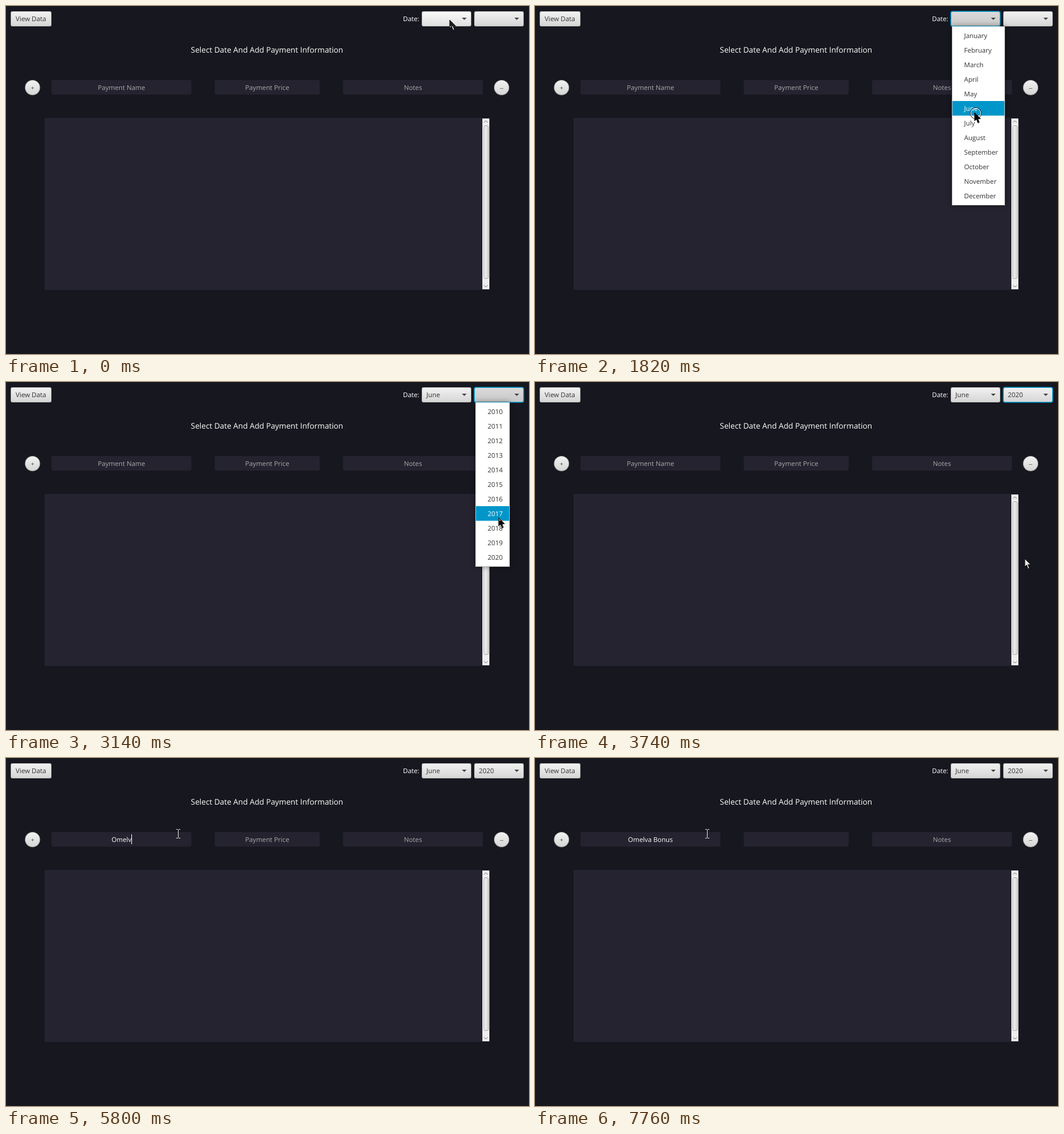
Write an HTML page that moves like this. It is 897 by 597 pixels and loops after 8000 ms.

```html
<!DOCTYPE html>
<html lang="en">
<head>
<meta charset="utf-8">
<title>Payment form</title>
<style>
  html, body { margin: 0; width: 100%; height: 100%; overflow: hidden; background: #17171f; }
  svg { display: block; width: 100vw; height: 100vh; }
  text {
    font: 11.3px "Open Sans", "Noto Sans", sans-serif;
    fill: #333; white-space: pre; text-rendering: geometricPrecision;
  }
  .light { fill: #fff; }
  .title { font-size: 13.3px; }
  .prompt { fill: #aaaaac; }
  .mid { text-anchor: middle; }
  .small { font-size: 9.5px; }
  .panel { fill: #24232f; }
  .popup { filter: drop-shadow(0 0 5px rgba(0, 0, 0, .45)); }
  .invert { fill: #fff; mix-blend-mode: difference; }
  .hidden { display: none; }
</style>
</head>
<body>
<svg id="stage" viewBox="0 0 897 597" preserveAspectRatio="none">
  <defs>
    <linearGradient id="normal" x2="0" y2="1"><stop stop-color="#f1f1f1"/><stop offset="1" stop-color="#d6d6d6"/></linearGradient>
    <linearGradient id="hover" x2="0" y2="1"><stop stop-color="#fafafa"/><stop offset="1" stop-color="#dfdfdf"/></linearGradient>
    <linearGradient id="pressed" x2="0" y2="1"><stop stop-color="#dadada"/><stop offset="1" stop-color="#c8c8c8"/></linearGradient>
    <linearGradient id="thumb"><stop stop-color="#f0f0f0"/><stop offset="1" stop-color="#d9d9d9"/></linearGradient>
  </defs>
</svg>
<script>
const LOOP = 8000, STEP = 120, FIRST_MOVE = 620, ROW = 25, LIST_TOP = 38;
const stage = document.getElementById('stage');
const $ = id => document.getElementById(id);

const months = ['January', 'February', 'March', 'April', 'May', 'June', 'July',
  'August', 'September', 'October', 'November', 'December'];
const years = Array.from({ length: 11 }, (_, i) => String(2010 + i));

// time, x, y of the pointer
const path = [
  [0, 761, 24], [860, 761, 24], [1700, 754, 183], [1940, 754, 183],
  [2240, 856, 28], [2660, 856, 28], [3380, 841, 305], [3740, 840, 303],
  [3860, 835, 277], [4460, 295, 130]
];
const clicks = [620, 1820, 2420, 3500];

const entry = 'Omelva Bonus';
// time, number of typed letters
const typing = [[4950, 1], [5190, 2], [5310, 3], [5550, 4], [5800, 5], [5920, 6],
  [6040, 7], [6410, 8], [6530, 9], [6770, 11], [6890, 12]];
const NAME_FOCUS = 4460, PRICE_FOCUS = 7390, CARET_OFF = 7760;

const text = (x, y, str, cls = '', id = '') =>
  `<text x="${x}" y="${y}" class="${cls}" id="${id}">${str}</text>`;
const rect = (x, y, w, h, attrs = '') =>
  `<rect x="${x}" y="${y}" width="${w}" height="${h}" ${attrs}/>`;

const button = (x, w, id = '') =>
  rect(x, 9, w, 26, 'rx="3" fill="#b5b5b5"') +
  rect(x + 1, 10, w - 2, 24, `rx="2" fill="url(#normal)" id="${id}"`);

const combo = (x, id) => button(x, 85, id) +
  rect(x + .2, 9.2, 84.6, 25.6, `rx="3" fill="none" stroke="#039ed3" stroke-width="1.5" id="${id}Ring"`) +
  text(x + 8, 26, '', '', id + 'Text') +
  `<path d="M${x + 69} 20h8l-4 4z" fill="#444"/>`;

const field = (x, w, prompt, id) =>
  rect(x, 127, w, 25, 'rx="3" class="panel"') +
  text(x + w / 2, 144, prompt, 'mid prompt', id);

const round = (x, label) =>
  `<circle cx="${x}" cy="140" r="13" fill="#b3b3b3"/>
   <circle cx="${x}" cy="139.7" r="12" fill="url(#normal)"/>` +
  text(x, 143.5, label, 'mid small');

const popup = (x, w, items, id) => {
  const h = items.length * ROW + 7;
  return `<g id="${id}">` +
    rect(x, 35, w, h, 'fill="#c4c4c4" class="popup"') +
    rect(x + 1, 35, w - 2, h - 1, 'fill="#fff"') +
    rect(x + 1, LIST_TOP, w - 2, ROW, `fill="#0096c9" id="${id}Mark"`) +
    items.map((s, i) => text(x + 21, 55 + i * ROW, s)).join('') + '</g>';
};

stage.insertAdjacentHTML('beforeend',
  rect(0, 0, 897, 597, 'fill="#17171f"') +
  button(8, 70) + text(42.7, 26, 'View Data', 'mid') +
  text(681, 26, 'Date:', 'light') + combo(713, 'month') + combo(803, 'year') +
  text(447.7, 80, 'Select Date And Add Payment Information', 'mid light title') +
  round(45.5, '+') + round(850, '--') +
  field(78, 240, 'Payment Name', 'name') +
  field(358, 180, 'Payment Price', 'price') +
  field(578, 240, 'Notes', 'notes') +
  rect(0, 131, 1, 17, 'fill="#fff" id="caret"') +
  rect(66, 192, 764, 295, 'class="panel"') +
  rect(817, 193, 12, 293, 'fill="#efefef"') +
  rect(819.5, 205.5, 8, 262, 'rx="2" fill="url(#thumb)" stroke="#ababab"') +
  `<path d="M819.5 200l3.5-3 3.5 3M819.5 479l3.5 3 3.5-3" fill="none" stroke="#777"/>` +
  popup(715, 91, months, 'monthList') + popup(805, 59, years, 'yearList') +
  `<g id="click" fill="none"><circle r="9.5" stroke="#111"/><circle r="8.5" stroke="#fff"/></g>
   <path id="arrow" class="invert" d="M0 0V14L3.2 11 5.7 17.5 8 16.5 5.5 10.3H10Z"/>
   <path id="outline" d="M0 0V14L3.2 11 5.7 17.5 8 16.5 5.5 10.3H10Z" fill="none" stroke="#000" stroke-width=".9"/>
   <path id="beam" d="M292 122.5h2.5l1 1 1-1h2.5M295.5 123v14M292 137.5h2.5l1-1 1 1h2.5" fill="none" stroke="#e8e8e0"/>`);

const show = (id, on) => $(id).classList.toggle('hidden', !on);
const within = (t, a, b) => t >= a && t < b;

function pointerAt(t) {
  const i = path.findIndex(p => p[0] > t);
  if (i < 0) return path[path.length - 1].slice(1);
  const [t0, x0, y0] = path[i - 1], [t1, x1, y1] = path[i];
  const u = (t - t0) / (t1 - t0), e = u * u * (3 - 2 * u);
  return [Math.round(x0 + (x1 - x0) * e), Math.round(y0 + (y1 - y0) * e)];
}

function drawList(id, items, open, y) {
  show(id, open);
  const row = Math.max(0, Math.min(items.length - 1, Math.floor((y - LIST_TOP) / ROW)));
  $(id + 'Mark').setAttribute('y', LIST_TOP + row * ROW);
  $(id).querySelectorAll('text').forEach((el, i) => el.classList.toggle('light', i === row));
}

function drawCombo(id, fill, focused, value) {
  $(id).setAttribute('fill', `url(#${fill})`);
  show(id + 'Ring', focused);
  $(id + 'Text').textContent = value;
}

function drawFields(t) {
  const focused = t >= NAME_FOCUS;
  const typed = typing.reduce((n, [at, count]) => t >= at ? count : n, 0);
  const name = $('name');
  name.textContent = focused ? entry.slice(0, typed) : 'Payment Name';
  name.classList.toggle('prompt', !focused);
  name.classList.toggle('light', focused);
  $('price').textContent = t >= PRICE_FOCUS ? '' : 'Payment Price';
  show('caret', within(t, NAME_FOCUS, CARET_OFF));
  const end = typed ? name.getComputedTextLength() / 2 : 0;
  $('caret').setAttribute('x', t >= PRICE_FOCUS ? 448 : Math.round(198 + end));
}

function draw(t) {
  const tick = t < FIRST_MOVE ? 0 : FIRST_MOVE + Math.floor((t - FIRST_MOVE) / STEP) * STEP;
  const [x, y] = pointerAt(tick);
  const place = `translate(${x} ${y})`;

  drawCombo('month', t < 620 ? 'hover' : t < 1940 ? 'pressed' : 'normal',
    within(t, 620, 2420), t >= 1940 ? 'June' : '');
  drawCombo('year', within(t, 2420, 3620) ? 'pressed' : within(t, 2300, 2420) ? 'hover' : 'normal',
    within(t, 2420, NAME_FOCUS), t >= 3620 ? '2020' : '');
  drawList('monthList', months, within(t, 740, 1940), y);
  drawList('yearList', years, within(t, 2540, 3620), y);
  drawFields(t);

  for (const id of ['arrow', 'outline']) {
    $(id).setAttribute('transform', place);
    show(id, t < NAME_FOCUS);
  }
  const clicking = clicks.includes(tick);
  $('outline').setAttribute('fill', clicking ? '#000' : 'none');
  $('click').setAttribute('transform', `translate(${x + 2} ${y + 1})`);
  show('click', clicking);
  show('beam', t >= NAME_FOCUS);
}

const start = performance.now();
function frame() {
  draw((performance.now() - start) % LOOP);
  requestAnimationFrame(frame);
}
frame();
</script>
</body>
</html>
```
